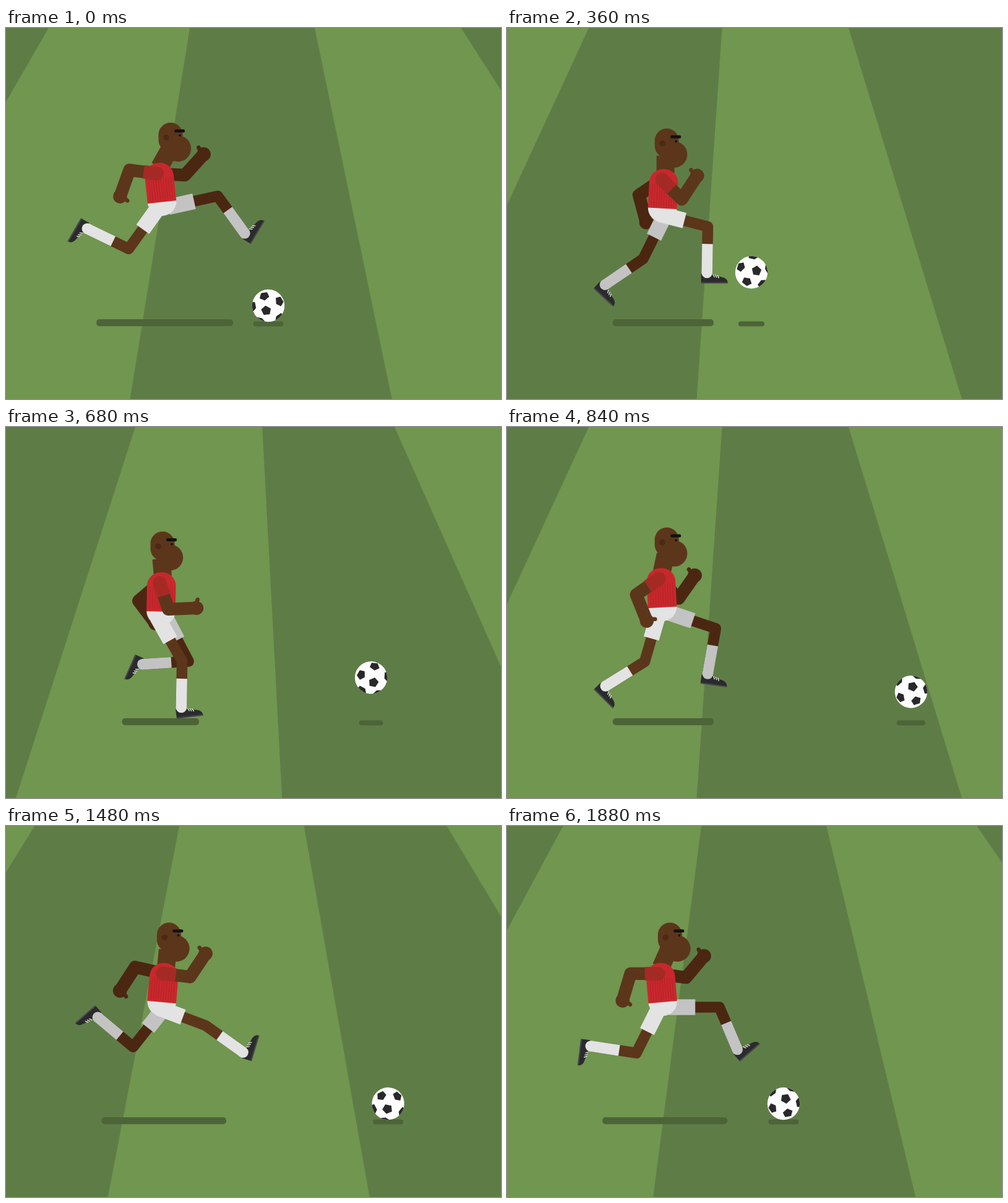
Write an HTML page with a canvas that moves like this. It is 800x600 px and loops after 1.92 s.

```html
<!DOCTYPE html>
<html lang="en">
<head>
<meta charset="utf-8">
<title>Football run</title>
<style>
html, body { margin: 0; width: 100%; height: 100%; overflow: hidden; background: #70964f; }
canvas { display: block; width: 800px; height: 600px; }
</style>
</head>
<body>
<canvas id="stage" width="800" height="600"></canvas>
<script>
const ctx = document.getElementById('stage').getContext('2d');
const RAD = Math.PI / 180;
const STEP = 40, FRAMES = 48, CYCLE = 24;

const C = {
  light: '#70964f', dark: '#5e7d46', shade: '#4d6338',
  skin: '#5c361b', skinFar: '#4b2712', ear: '#4a2a13', brow: '#121212',
  shirt: '#c8282d', sleeve: '#a52a26',
  cloth: '#e3e3e3', clothFar: '#c3c3c3',
  shoe: '#2b2a2d', sole: '#47464a', ball: '#fdfdfd', patch: '#29292b'
};

// Poses over one run cycle: [phase, thigh, shin, foot] and [phase, upper arm, forearm]
const nearLeg = [
  [0, 125.6, 206, 120], [1, 128, 216, 136], [5, 54.8, 171, 108], [9, 14.5, 91, 0],
  [11, 3, 66, -41], [12, 2, 52, -59], [13, 20.5, 35.6, -73], [17, 60.7, 91, -7],
  [21, 106, 148, 45], [23, 116.6, 188.7, 97]
];
const farLeg = [
  [0, -12.5, 54, -59], [1, 6, 38, -73], [5, 63.6, 97.5, 0], [9, 116.4, 145.7, 43],
  [11, 121, 189, 97], [12, 125.6, 206, 120], [13, 128.3, 220, 139], [17, 62.3, 176.5, 114],
  [21, 18.5, 100, 8], [23, 0, 67, -41]
];
const nearArm = [
  [0, 187.6, 109.6], [1, 190, 114], [5, 138.7, 51], [9, 45, -56.7], [11, 8, -50],
  [12, 3, -48], [13, 7.4, -56.3], [17, 71.8, -2.5], [21, 145, 68], [23, 180, 106.5]
];
const farArm = [
  [0, 3, -48], [1, 7, -54], [5, 78, 4], [9, 146, 75], [11, 180, 107],
  [12, 188, 113], [13, 193, 123], [17, 139.5, 53], [21, 45, -55], [23, 8, -50]
];

// Ball, counted from the kick
const KICK = 6;
const ballX = [[6, 286], [9, 395], [17, 590], [21, 653], [29, 686], [37, 617.5], [47, 447], [48, 424], [54, 286]];
const ballSpin = [[6, -300], [9, -131], [17, 309], [21, 533], [29, 545], [37, 343], [47, -181]];
const ballShade = [[6, 49], [9, 42], [13, 38], [17, 39], [21, 46], [29, 47], [37, 49], [54, 49]];
const patches = [[-3.5, 8], [-6.5, -15.3], [17.8, -7], [-24.5, 1], [17.5, 18.5], [-12.5, 23.5]];

// Smooth curve through keys without overshoot
function curve(keys, x, col = 1) {
  let i = 1;
  while (i < keys.length - 1 && keys[i][0] < x) i++;
  const sec = j => keys[j] && keys[j + 1]
    ? (keys[j + 1][col] - keys[j][col]) / (keys[j + 1][0] - keys[j][0]) : null;
  const tan = j => {
    const a = sec(j - 1), b = sec(j);
    if (a === null) return b;
    if (b === null) return a;
    return a * b <= 0 ? 0 : 2 * a * b / (a + b);
  };
  const k0 = keys[i - 1], k1 = keys[i], w = k1[0] - k0[0];
  const u = (x - k0[0]) / w, v = 1 - u;
  return k0[col] * (1 + 2 * u) * v * v + tan(i - 1) * w * u * v * v
       + k1[col] * u * u * (3 - 2 * u) - tan(i) * w * u * u * v;
}

function looped(keys) {
  const shift = d => k => [k[0] + d, ...k.slice(1)];
  return [...keys.slice(-2).map(shift(-CYCLE)), ...keys, ...keys.slice(0, 2).map(shift(CYCLE))];
}
const tracks = { nearLeg: looped(nearLeg), farLeg: looped(farLeg), nearArm: looped(nearArm), farArm: looped(farArm) };

const go = (p, deg, len) => [p[0] + Math.cos(deg * RAD) * len, p[1] + Math.sin(deg * RAD) * len];

function line(color, width, pts, cap = 'butt') {
  ctx.strokeStyle = color;
  ctx.lineWidth = width;
  ctx.lineCap = cap;
  ctx.lineJoin = 'round';
  ctx.beginPath();
  pts.forEach(p => ctx.lineTo(p[0], p[1]));
  ctx.stroke();
}

function disc(color, x, y, r) {
  ctx.fillStyle = color;
  ctx.beginPath();
  ctx.arc(x, y, r, 0, 2 * Math.PI);
  ctx.fill();
}

function bar(color, x, y, w, h, r) {
  ctx.fillStyle = color;
  ctx.beginPath();
  ctx.roundRect(x, y, w, h, r);
  ctx.fill();
}

function at(p, deg, draw) {
  ctx.save();
  ctx.translate(p[0], p[1]);
  ctx.rotate(deg * RAD);
  draw();
  ctx.restore();
}

function pitch(f) {
  const cx = 385, cy = -547.4, wedge = 20.88, edge = 11.75 - wedge * f / 12;
  const ray = deg => ctx.lineTo(cx + 3000 * Math.sin(deg * RAD), cy + 3000 * Math.cos(deg * RAD));
  ctx.fillStyle = C.light;
  ctx.fillRect(0, 0, 800, 600);
  ctx.fillStyle = C.dark;
  for (let k = -1; k < 4; k++) {
    ctx.beginPath();
    ctx.moveTo(cx, cy);
    ray(edge + (2 * k - 1) * wedge);
    ray(edge + 2 * k * wedge);
    ctx.fill();
  }
}

function shoe() {
  ctx.fillStyle = C.shoe;
  ctx.beginPath();
  ctx.moveTo(-9.5, 2);
  ctx.lineTo(9, 3);
  ctx.quadraticCurveTo(16, 6, 24, 7);
  ctx.quadraticCurveTo(33, 9, 33.5, 16);
  ctx.lineTo(-9.5, 16);
  ctx.fill();
  ctx.fillStyle = C.sole;
  ctx.fillRect(-9.5, 15.3, 43, 2.2);
  for (let i = 0; i < 3; i++) line('#f4f4f4', 1.3, [[10 + i * 3.6, 3 + i * 0.7], [12 + i * 3.6, 7 + i * 0.7]], 'round');
}

function leg(keys, p, hip, skin, cloth) {
  const [thigh, shin, foot] = [1, 2, 3].map(c => curve(keys, p, c));
  const knee = go(hip, thigh, 82), ankle = go(knee, shin, 74.5);
  line(skin, 17.5, [hip, knee, ankle]);
  at(ankle, foot, shoe);
  line(cloth, 17.5, [go(knee, shin, 28), ankle]);
  disc(cloth, ankle[0], ankle[1], 8.75);
  line(cloth, 25.5, [hip, go(hip, thigh, 43)]);
}

function arm(keys, p, shoulder, skin, sleeve) {
  const upper = curve(keys, p, 1), fore = curve(keys, p, 2);
  const elbow = go(shoulder, upper, 45), hand = go(elbow, fore, 45.5);
  line(skin, 20.5, [shoulder, elbow, hand]);
  at(hand, fore, () => {
    disc(skin, 0, 0, 11.3);
    line(skin, 6.5, [[-1, -5], [2.5, -13.5]], 'round');
  });
  if (sleeve) {
    line(sleeve, 22, [shoulder, go(shoulder, upper, 22)]);
    disc(sleeve, shoulder[0], shoulder[1], 11);
  }
}

function head(x, y, neck) {
  line(C.skin, 29, [[x + 5, y + 20], neck]);
  line(C.skin, 39, [[x + 7, y - 4.5], [x + 7, y + 4]], 'round');
  disc(C.skin, x + 19, y + 18, 21.2);
  disc(C.ear, x, y, 4.8);
  disc(C.brow, x + 22, y - 3.4, 1.9);
  bar(C.brow, x + 13, y - 13, 17, 5, 2);
}

function shirt() {
  bar(C.shirt, -23.3, -63, 46.6, 63.5, [22, 22, 0, 0]);
  for (let x = -18; x < 22; x += 4) line('rgba(120,15,20,0.22)', 1, [[x, -38], [x, -3]]);
}

function player(f) {
  const p = f % CYCLE, m = f % 12;
  const h = Math.min(m, 12 - m);
  const lean = 6 - Math.abs(12 - p);
  const pelvis = [252 - 0.3 * h, 281 + 3.4 * h];
  const tilt = -6 + Math.min(p, CYCLE - p);
  const onBody = (x, y) => {
    const c = Math.cos(tilt * RAD), s = Math.sin(tilt * RAD);
    return [pelvis[0] + x * c - y * s, pelvis[1] + x * s + y * c];
  };
  const shoulder = onBody(-3, -46);

  bar(C.shade, 146 + 8.3 * h, 471, 221 - 19.3 * h, 11.3, 5);
  arm(tracks.farArm, p, shoulder, C.skinFar);
  leg(tracks.farLeg, p, [pelvis[0] + 7 - tilt / 2, pelvis[1] + 8.5], C.skinFar, C.clothFar);
  head(259 - 2.6 * h, 177 + 3.2 * h, onBody(2, -56));
  leg(tracks.nearLeg, p, [pelvis[0] - 6, pelvis[1] + 9.5], C.skin, C.cloth);
  at(pelvis, tilt, () => {
    ctx.fillStyle = C.cloth;
    ctx.beginPath();
    ctx.arc(0, -0.5, 23.3, 0, Math.PI);
    ctx.fill();
    shirt();
  });
  arm(tracks.nearArm, p, shoulder, C.skin, C.sleeve);
}

function pentagon(x, y) {
  const d = Math.hypot(x, y), out = Math.atan2(y, x);
  const [cx, cy] = patches[0];
  const middle = x === cx && y === cy;
  const facing = middle ? -97 * RAD : Math.atan2(cy - y, cx - x);
  ctx.save();
  ctx.translate(x, y);
  ctx.rotate(out);
  ctx.scale(Math.sqrt(1 - (d / 30) ** 2), 1);
  ctx.beginPath();
  for (let i = 0; i < 5; i++) {
    const a = facing - out + i * 72 * RAD;
    ctx.lineTo(8.4 * Math.cos(a), 8.4 * Math.sin(a));
  }
  ctx.fill();
  ctx.restore();
}

function ballHeight(f) {
  const top = 390, drop = 59;
  if (f < 12) return top + drop * (1 - (f - KICK) / 6) ** 3.5;
  const u = Math.min((f - 12) / 15, 1);
  return top + drop * u * u * (3 - 2 * u);
}

function ball(frame) {
  const f = frame < KICK ? frame + FRAMES : frame;
  const x = curve(ballX, f), y = ballHeight(f), w = curve(ballShade, f);
  const spin = f >= FRAMES ? -50 * (f - FRAMES) : curve(ballSpin, f);
  bar(C.shade, x - w / 2, 474.5, w, 8, 4);
  at([x, y], spin, () => {
    disc(C.ball, 0, 0, 26.2);
    ctx.clip();
    ctx.fillStyle = C.patch;
    patches.forEach(q => pentagon(q[0], q[1]));
  });
}

const start = performance.now();
function draw() {
  const f = Math.floor((performance.now() - start) / STEP) % FRAMES;
  pitch(f);
  player(f);
  ball(f);
  requestAnimationFrame(draw);
}
draw();
</script>
</body>
</html>
```
